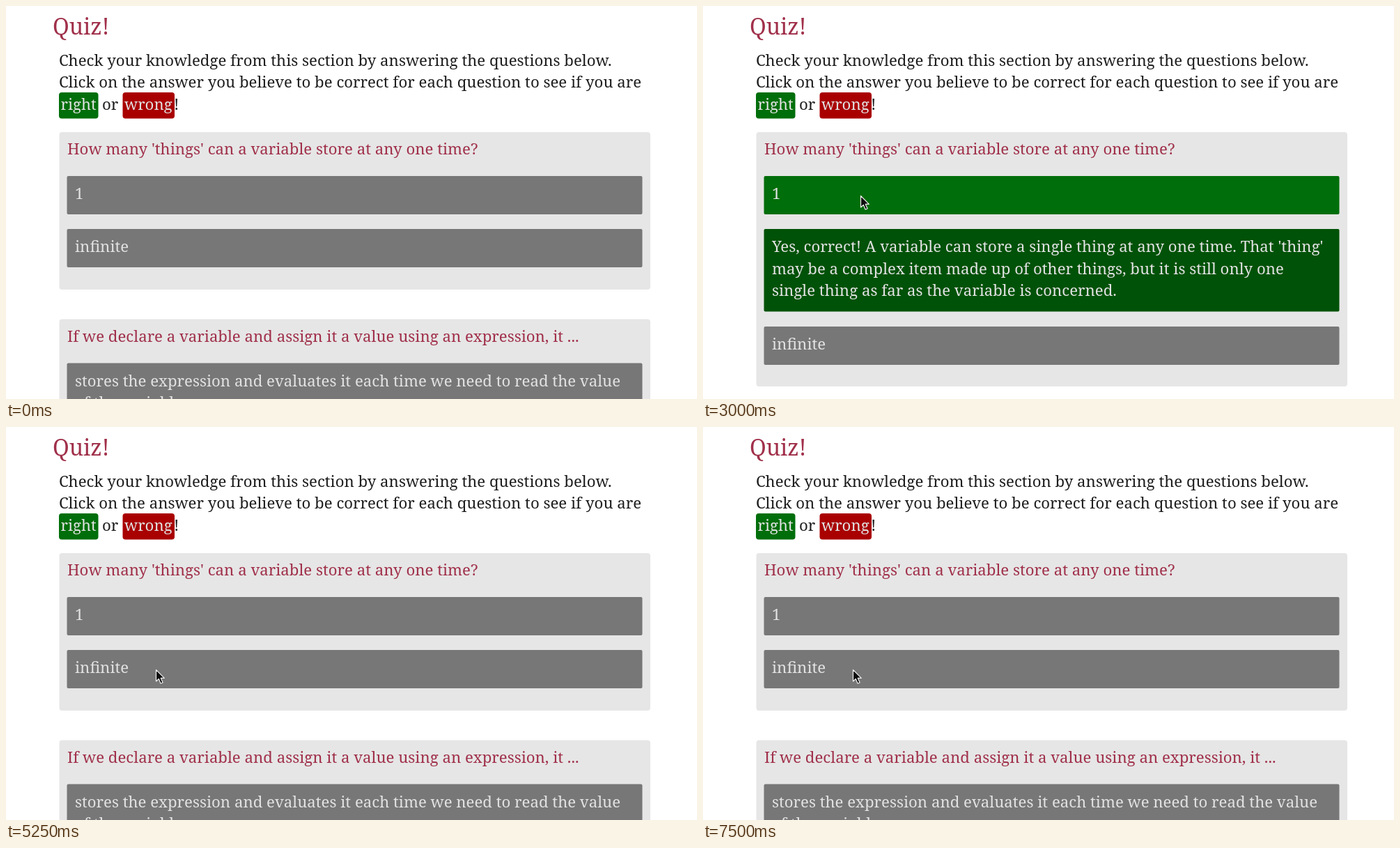
Write an HTML page that moves like this. It is 992 px wide and 564 px high and loops after 8 s.

```html
<!DOCTYPE html>
<html lang="en">
<head>
<meta charset="utf-8">
<title>Quiz</title>
<style>
  html, body { margin: 0; width: 100%; height: 100%; overflow: hidden; background: #fff; }
  svg { display: block; width: 100%; height: 100%; }
  text { font: 22.2px "Noto Serif", "DejaVu Serif", serif; white-space: pre; }
  .title { font-size: 32px; }
  g, #cursor { filter: blur(.5px); }
</style>
</head>
<body>
<svg id="stage" viewBox="0 0 992 564"></svg>
<script>
const INK = '#1e1e1e', CRIMSON = '#a0304a', PANEL = '#e6e6e6', GREY = '#777', PALE = '#e2e2e2';
const GREEN = '#006e0a', DARK_GREEN = '#005208', RED = '#a90000', DARK_RED = '#670000';
const LINE_HEIGHT = 31.7;

const rect = (x, y, right, bottom, fill, radius = 2) =>
  `<rect x="${x}" y="${y}" width="${right - x}" height="${bottom - y}" rx="${radius}" fill="${fill}"/>`;

const text = (x, y, content, fill, className = '') =>
  `<text x="${x}" y="${y}" fill="${fill}" class="${className}">${content}</text>`;

const panel = (top, bottom, question) =>
  rect(76.5, top, 925, bottom, PANEL, 4) + text(88, top + 32, question, CRIMSON);

// A full-width bar whose height follows its number of text lines.
const bar = (top, fill, ...lines) =>
  rect(87.5, top, 913.5, top + 55 + (lines.length - 1) * LINE_HEIGHT, fill) +
  lines.map((line, i) => text(99, top + 33 + i * LINE_HEIGHT, line, PALE)).join('');

const header =
  text(67, 41, 'Quiz!', CRIMSON, 'title') +
  text(76, 85.5, 'Check your knowledge from this section by answering the questions below.', INK) +
  text(76, 117.2, 'Click on the answer you believe to be correct for each question to see if you are', INK) +
  rect(76, 124, 132.5, 161.5, GREEN, 4) + text(78.5, 149, 'right', PALE) +
  text(138, 149, 'or', INK) +
  rect(167.5, 124, 242, 161.5, RED, 4) + text(170, 149, 'wrong', PALE) +
  text(241, 149, '!', INK);

const QUESTION = "How many 'things' can a variable store at any one time?";

const views = {
  idle:
    panel(181, 407, QUESTION) +
    bar(244, GREY, '1') +
    bar(320, GREY, 'infinite') +
    panel(449.5, 600, 'If we declare a variable and assign it a value using an expression, it ...') +
    bar(512.5, GREY,
      'stores the expression and evaluates it each time we need to read the value',
      'of the variable'),
  right:
    panel(181, 546, QUESTION) +
    bar(244, GREEN, '1') +
    bar(320, DARK_GREEN,
      "Yes, correct! A variable can store a single thing at any one time. That 'thing'",
      'may be a complex item made up of other things, but it is still only one',
      'single thing as far as the variable is concerned.') +
    bar(460, GREY, 'infinite'),
  wrong:
    panel(181, 600, QUESTION) +
    bar(244, GREY, '1') +
    bar(320, RED, 'infinite') +
    bar(396.5, DARK_RED,
      "No, sorry, that's incorrect. Each data item we store in a variable takes up an",
      'amount of the computers available memory. To store an infinite number of',
      'values in a variable we would need a computer with infinite memory. This',
      'does not currently exist.')
};

const stage = document.getElementById('stage');
stage.innerHTML = `<g>${header}</g>` +
  Object.entries(views).map(([name, content]) => `<g id="${name}">${content}</g>`).join('') +
  `<path id="cursor" d="M0 0V16.5L3.8 13L6.6 19.5L9.6 18.2L6.8 11.9H11.8Z"
    fill="#0c0c0c" stroke="#eee" stroke-width="1.2" stroke-linejoin="round"/>`;

const TICK = 1000 / 12, LOOP = 8000;
const cursorPath = [
  [14, 273, 405], [15, 257, 330], [16, 245, 287], [17, 245, 287], [21, 244.5, 275.5],
  [29, 244.5, 275.5], [32, 226.5, 272.5], [57, 226.5, 272.5], [63, 215.5, 348.5], [96, 215.5, 348.5]
];

function cursorAt(tick) {
  const next = cursorPath.findIndex(key => key[0] > tick);
  const [t0, x0, y0] = cursorPath[next - 1];
  const [t1, x1, y1] = cursorPath[next];
  const p = (tick - t0) / (t1 - t0);
  const eased = p * p * (3 - 2 * p);
  return [x0 + (x1 - x0) * eased, y0 + (y1 - y0) * eased];
}

function viewAt(tick) {
  if (tick >= 35 && tick < 51) return 'right';
  if (tick >= 68 && tick < 88) return 'wrong';
  return 'idle';
}

const cursor = document.getElementById('cursor');
const groups = Object.keys(views).map(name => document.getElementById(name));

function render(now) {
  const tick = Math.floor(((now % LOOP) + 3.4) / TICK) % 96;
  const view = viewAt(tick);
  for (const group of groups) group.style.display = group.id === view ? '' : 'none';

  const visible = tick >= cursorPath[0][0];
  cursor.style.display = visible ? '' : 'none';
  if (visible) cursor.setAttribute('transform', `translate(${cursorAt(tick)})`);
}

let start;
function frame(now) {
  start ??= now;
  render(now - start);
  requestAnimationFrame(frame);
}
render(0);
requestAnimationFrame(frame);
</script>
</body>
</html>
```
